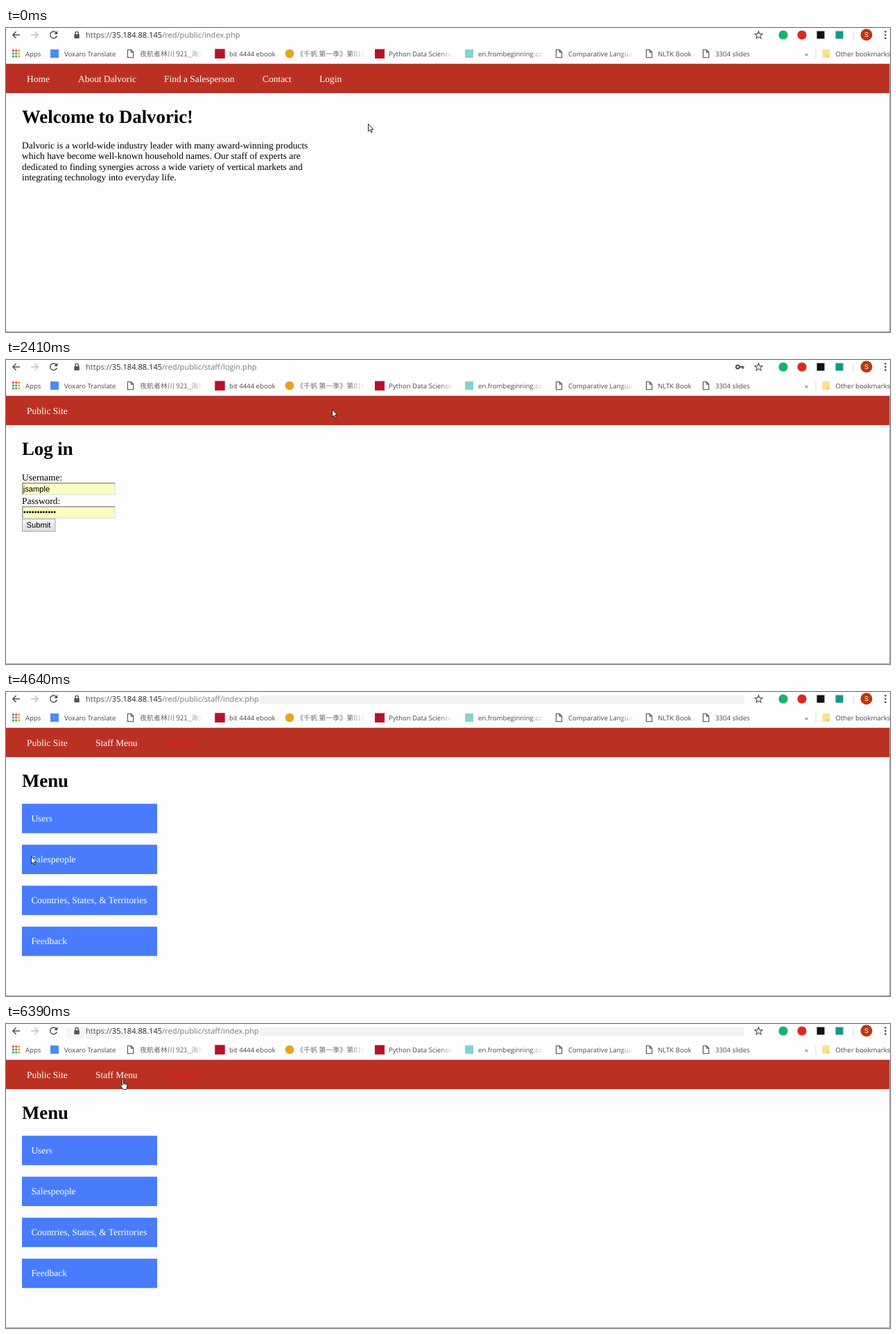
Animation, 1275 px wide and 439 px high, one loop 8 s. Source, as an HTML page:

```html
<!DOCTYPE html>
<html lang="en">
<head>
<meta charset="utf-8">
<title>Browser walkthrough</title>
<style>
  html, body { margin: 0; width: 100%; height: 100%; overflow: hidden; background: #fdfdfd; }
  svg { display: block; width: 1275px; height: 439px; }
  text { white-space: pre; text-rendering: geometricPrecision; }
  .serif { font: 13.44px "Liberation Serif", serif; }
  .title { font: bold 26.8px "Liberation Serif", serif; }
  .form { font: 11.2px "Liberation Sans", sans-serif; }
  .mark { font: 9.6px "Open Sans", "Noto Sans", sans-serif; fill: #45484c; }
  .han { font: 10px "Noto Sans CJK SC", "Noto Sans CJK", sans-serif; fill: #66696d; }
  .url { font: 11.1px "Open Sans", "Noto Sans", sans-serif; fill: #74777b; }
  .line { fill: none; stroke: #4a4d51; stroke-width: 1.4; }
</style>
</head>
<body>
<svg id="stage" viewBox="0 0 1275 439" xmlns="http://www.w3.org/2000/svg">
  <defs>
    <linearGradient id="fade">
      <stop offset="0" stop-color="#fff" stop-opacity="0"/>
      <stop offset="1" stop-color="#fff"/>
    </linearGradient>
    <linearGradient id="face" x2="0" y2="1">
      <stop offset="0" stop-color="#f6f6f6"/>
      <stop offset="1" stop-color="#dddddd"/>
    </linearGradient>
  </defs>
</svg>
<script>
const LOOP = 8000;
const stage = document.getElementById('stage');

function add(parent, tag, attrs, content) {
  const node = document.createElementNS(stage.namespaceURI, tag);
  for (const key in attrs) node.setAttribute(key, attrs[key]);
  if (content !== undefined) node.textContent = content;
  return parent.appendChild(node);
}
const group = (parent = stage) => add(parent, 'g', {});
const rect = (p, x, y, width, height, fill, more) =>
  add(p, 'rect', { x, y, width, height, fill, ...more });
const disc = (p, cx, cy, r, fill) => add(p, 'circle', { cx, cy, r, fill });
const path = (p, d, more) => add(p, 'path', { d, ...more });
const line = (p, d, more) => path(p, d, { class: 'line', ...more });
const text = (p, x, y, kind, content, fill) =>
  add(p, 'text', fill ? { x, y, class: kind, fill } : { x, y, class: kind }, content);

// Page backdrop and toolbar
rect(stage, 0, 0, 1275, 439, '#fdfdfd');
rect(stage, 0, 0, 1275, 51, '#ffffff');
const loadTint = rect(stage, 63, 5, 415, 23, '#f9fbfb');
const barTint = rect(stage, 366, 5, 699, 12, '#f1f3f4');
const clickTint = path(stage, 'M87 5H176V21H96Q87 21 87 12Z', { fill: '#f4f6f7' });
const bar = group();
line(bar, 'M20 10H10M14.6 5.2L9.8 10L14.6 14.8');
line(bar, 'M36 10H46M41.4 5.2L46.2 10L41.4 14.8', { stroke: '#bdbfc2', style: 'stroke:#bdbfc2' });
const reload = group(bar);
line(reload, 'M72.4 6.8A4.9 4.9 0 1 0 73.3 11.3');
path(reload, 'M74.3 4V9H69.3Z', { fill: '#4a4d51' });
const stop = line(bar, 'M64 5.3L73.4 14.7M73.4 5.3L64 14.7');
rect(bar, 98.3, 9, 7.6, 6, '#54575b', { rx: .8 });
line(bar, 'M100 9V7.5a2.1 2.1 0 0 1 4.2 0V9', { 'stroke-width': 1.1 });

const url = text(bar, 115, 14, 'url');
add(url, 'tspan', { fill: '#505357' }, 'https://');
add(url, 'tspan', { style: 'fill:#202124' }, '35.184.88.145');
const urlPath = add(url, 'tspan', {}, '');

const key = group(bar);
add(key, 'circle', { cx: 1055.4, cy: 10, r: 2.4, class: 'line', style: 'stroke-width:2' });
line(key, 'M1058 10H1064.5M1062.6 10V13', { style: 'stroke-width:2' });

const star = Array.from({ length: 10 }, (_, i) => {
  const a = i * Math.PI / 5 - Math.PI / 2, r = i % 2 ? 2.5 : 5.8;
  return (1085.5 + r * Math.cos(a)).toFixed(2) + ' ' + (10.4 + r * Math.sin(a)).toFixed(2);
});
line(bar, 'M' + star.join('L') + 'Z', { style: 'stroke-width:1.1' });
disc(bar, 1121, 10, 6.6, '#15b371');
disc(bar, 1148, 10, 6.6, '#e0281c');
rect(bar, 1169.5, 4.5, 11, 11, '#151310');
rect(bar, 1196.5, 4.5, 11, 11, '#119a82');
rect(bar, 1221.5, 4, 1, 13, '#d5d7da');
disc(bar, 1241, 9.7, 8.5, '#bf360c');
add(bar, 'text', { x: 1241, y: 13.2, 'text-anchor': 'middle', fill: '#fff',
  style: 'font:9.5px Roboto, sans-serif' }, 'S');
for (const y of [5.3, 10, 14.7]) disc(bar, 1268.3, y, 1.35, '#4a4d51');

// Bookmarks
['#ea4335', '#ea4335', '#f2a600', '#34a853', '#4285f4', '#f2a600', '#34a853', '#34a853', '#f2a600']
  .forEach((c, i) => rect(bar, 9 + i % 3 * 4.2, 31.2 + Math.floor(i / 3) * 4.2, 2.8, 2.8, c));
rect(bar, 64, 31, 12, 12, '#4c8bf5');
rect(bar, 301.5, 30.5, 14, 13.5, '#b5122b');
disc(bar, 409, 37, 6.3, '#e5a51c');
rect(bar, 532, 30.5, 14, 13.5, '#b5122b');
rect(bar, 662, 31, 12, 12, '#82d3cf');
for (const x of [175.5, 793.5, 923.5, 1005.5])
  line(bar, `M${x} 31.5h5l3.2 3.2v8h-8.2zM${x + 4.8} 31.5v3.4h3.4`, { style: 'stroke-width:1.1' });
rect(bar, 1177.5, 31, 10.5, 12, '#fbe08a', { rx: 1 });
path(bar, 'M1184 43V39.5H1188Z', { fill: '#e8c65a' });
rect(bar, 1167.5, 30, 1, 14, '#d5d7da');

const marks = [
  [28, 'Apps'], [84, 'Voxaro Translate'], [193, '夜航者林川 921_海外', 284],
  [322, 'bit 4444 ebook'], [419, '《千帆 第一季》第01集', 517],
  [552, 'Python Data Science', 645], [681, 'en.frombeginning.com', 776],
  [811, 'Comparative Languages', 905], [940, 'NLTK Book'], [1023, '3304 slides'],
  [1152, '»'], [1196.5, 'Other bookmarks']
];
for (const [x, label, end] of marks) {
  text(bar, x, 40.5, /[一-龥]/.test(label) ? 'han' : 'mark', label);
  if (!end) continue;
  rect(bar, end - 20, 29, 20, 16, 'url(#fade)');
  rect(bar, end, 29, 13, 16, '#fff');
}
// Redraw the icons that sit next to a faded label
rect(bar, 301.5, 30.5, 14, 13.5, '#b5122b');
rect(bar, 0, 51, 1275, 1, '#d9c4c2');
rect(bar, 0, 52, 1275, 42, '#ba3124');

const nav = (p, items) => items.forEach(([x, label, fill]) =>
  text(p, x, 78, 'serif', label, fill || '#fff'));

// Home page
const home = group();
nav(home, [[30, 'Home'], [104, 'About Dalvoric'], [228, 'Find a Salesperson'],
  [370, 'Contact'], [452, 'Login']]);
text(home, 23, 137, 'title', 'Welcome to Dalvoric!');
['Dalvoric is a world-wide industry leader with many award-winning products',
  'which have become well-known household names. Our staff of experts are',
  'dedicated to finding synergies across a wide variety of vertical markets and',
  'integrating technology into everyday life.'
].forEach((row, i) => text(home, 23, 173.7 + i * 15.4, 'serif', row));

// Login page
const login = group();
nav(login, [[30, 'Public Site']]);
text(login, 23, 137, 'title', 'Log in');
function field(y) {
  rect(login, 23, y, 135, 18, '#e6e6e6');
  path(login, `M23 ${y}h135l-1.7 1.7h-131.6v14.6l-1.7 1.7z`, { fill: '#969696' });
  rect(login, 24.7, y + 1.7, 131.6, 14.6, '#faffbd');
}
field(177);
field(211);
text(login, 23, 173.7, 'serif', 'Username:');
text(login, 24.7, 190, 'form', 'jsample');
text(login, 23, 207.7, 'serif', 'Password:');
for (let i = 0; i < 12; i++) disc(login, 26.8 + i * 3.94, 219.8, 1.45, '#000');
const button = rect(login, 23.5, 229.5, 47.5, 18, 'url(#face)');
text(login, 29.5, 242, 'form', 'Submit');

// Staff menu
const menu = group();
nav(menu, [[30, 'Public Site'], [129, 'Staff Menu'], [231, 'Log out', '#ff0c08']]);
text(menu, 23, 137, 'title', 'Menu');
const tiles = ['Users', 'Salespeople', 'Countries, States, & Territories', 'Feedback']
  .map((label, i) => {
    const y = 161.4 + i * 59.15;
    const tile = rect(menu, 23, y, 195, 42.4, '#487cfd');
    text(menu, 36.4, y + 25.6, 'serif', label, '#fff');
    return tile;
  });

rect(stage, 1274, 52, 1, 387, '#a9a9a9');
rect(stage, 0, 438, 1275, 1, '#a9a9a9');

const outline = { fill: '#fff', stroke: '#111', 'stroke-width': .9, 'stroke-linejoin': 'round' };
const pointers = {
  arrow: path(stage, 'M.5 .5V11.2L2.9 9L4.6 12.8L6.2 12.1L4.6 8.4H7.8Z', outline),
  hand: path(stage, 'M3 1.6Q4 .1 5 1.6V6L9 7Q10.6 7.4 10.4 9.2L9.4 15.5H4.5L1 10.6Q.2 9.2 1.5 8.6L3 9.8ZM5 6V8.5M7 6.6V8.8M8.8 7V9', outline),
  beam: path(stage, 'M.3 .5H4.7M2.5 .5V10.8M.3 10.8H4.7', { fill: 'none', stroke: '#222', 'stroke-width': .9 })
};

// Each row starts at its first value, in ms
const moves = [
  [0, 'arrow', 522, 138], [560, 'arrow', 517, 136], [720, 'arrow', 505, 127],
  [870, 'arrow', 493, 113], [1020, 'arrow', 482, 98], [1150, 'arrow', 474, 88],
  [1300, 'hand', 469, 76], [1420, 'hand', 467, 70.5], [2410, 'arrow', 470, 71],
  [2840, 'arrow', 300, 148], [2970, 'arrow', 169, 204], [3120, 'beam', 125, 210],
  [3430, 'beam', 65.7, 226], [3580, 'arrow', 48, 234], [3710, 'arrow', 36, 237],
  [4890, 'hand', 36, 235], [5040, 'hand', 94, 190], [5190, 'arrow', 116, 152],
  [5320, 'arrow', 142, 114], [5440, 'arrow', 157, 90], [5580, 'hand', 164.5, 79]
];
const paths = [[0, '/red/public/index.php'], [1850, '/red/public/staff/login.php'],
  [4500, '/red/public/staff/index.php']];
const pages = [[0, home], [2410, login], [4640, menu]];

const at = (rows, t) => rows.reduce((found, row) => row[0] <= t ? row : found);
const show = (node, on) => node.setAttribute('visibility', on ? 'visible' : 'hidden');

function draw(t) {
  const within = (a, b) => t >= a && t < b;
  const [, kind, x, y] = at(moves, t);
  for (const name in pointers) show(pointers[name], name === kind);
  pointers[kind].setAttribute('transform', `translate(${x} ${y})`);

  const page = at(pages, t)[1];
  for (const [, node] of pages) show(node, node === page);
  urlPath.textContent = at(paths, t)[1];

  const loading = within(1850, 2410) || within(3980, 4640) || within(6140, 6390);
  show(stop, loading);
  show(reload, !loading);
  show(key, within(2410, 4500));
  show(loadTint, within(1850, 2410));
  show(barTint, t >= 4500);
  show(clickTint, t >= 6140);

  button.setAttribute('stroke', t >= 3580 ? '#7d7d7d' : '#a9a9a9');
  button.setAttribute('fill', within(3980, 4100) ? '#dcdcdc' : 'url(#face)');
  tiles[0].setAttribute('fill', within(5040, 5190) ? '#3d6ee0' : '#487cfd');
}

const start = performance.now();
function tick() {
  draw((performance.now() - start) % LOOP);
  requestAnimationFrame(tick);
}
draw(0);
requestAnimationFrame(tick);
</script>
</body>
</html>
```
